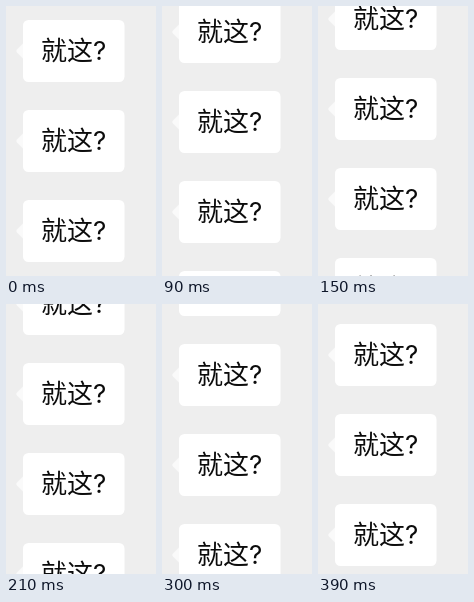
Write an HTML page that moves like this. It is 150 px wide and 270 px high and loops after 0.42 s.

```html
<!DOCTYPE html>
<html lang="zh-CN">
<head>
<meta charset="utf-8">
<style>
  html, body { margin: 0; width: 100%; height: 100%; overflow: hidden; background: #eee; }
  svg { display: block; width: 100vw; height: 100vh; }
  text { font: 26px Inter, "Noto Sans CJK SC", "Noto Sans CJK", sans-serif; fill: #0c0c0c; }
</style>
</head>
<body>
<svg viewBox="0 0 150 270">
  <defs>
    <g id="bubble">
      <path d="M18 36.500L11 43.500Q9.500 45 11 46.500L18 53.500Z" fill="#fafafa"/>
      <rect x="17" y="14" width="101.500" height="62" rx="5.500" fill="#fff"/>
      <text x="35" y="54">就这?</text>
    </g>
  </defs>
  <g id="list">
    <use href="#bubble"/>
    <use href="#bubble" y="90"/>
    <use href="#bubble" y="180"/>
    <use href="#bubble" y="270"/>
  </g>
</svg>
<script>
  const LOOP = 420, STEP = 30, SPACING = 90;
  const list = document.getElementById('list');
  const start = performance.now();

  // The list scrolls up by one bubble per loop, in steps of 30 ms.
  function draw() {
    const time = (performance.now() - start) % LOOP;
    const shift = Math.round(Math.floor(time / STEP) * STEP / LOOP * SPACING);
    list.setAttribute('transform', `translate(0 ${-shift})`);
    requestAnimationFrame(draw);
  }
  draw();
</script>
</body>
</html>
```
